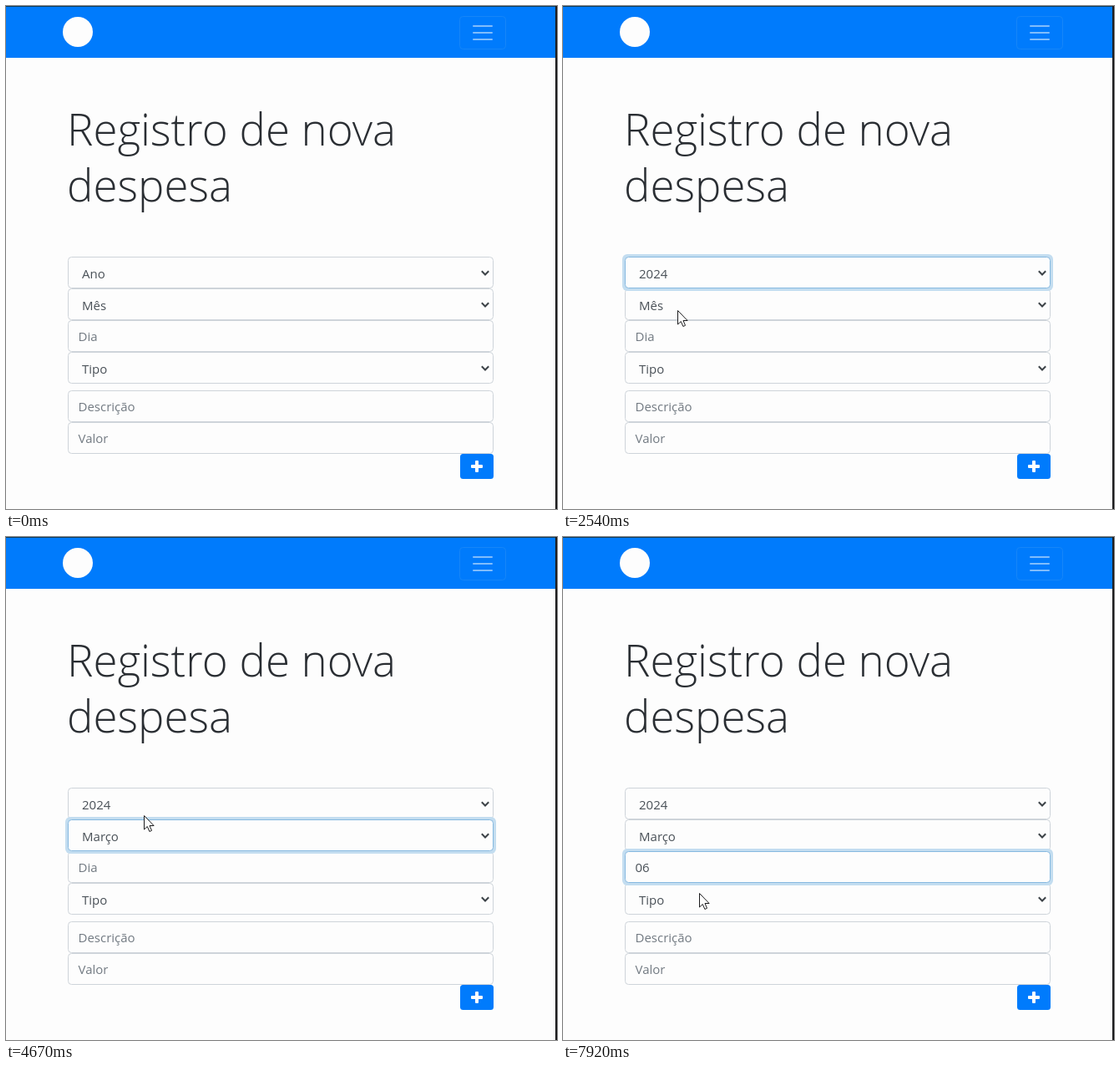
Recreate the animation shown at these times as an HTML page with a canvas. Size 660 px wide and 602 px high, loop 8000 ms.

```html
<!DOCTYPE html>
<html lang="pt-BR">
<head>
<meta charset="utf-8">
<title>Registro de nova despesa</title>
<style>
  html, body { margin: 0; width: 100%; height: 100%; overflow: hidden; background: #fdfdfd; }
  canvas { display: block; width: 660px; height: 602px; }
</style>
</head>
<body>
<canvas id="stage" width="660" height="602"></canvas>
<script>
const ctx = document.getElementById('stage').getContext('2d');
const LOOP = 8000;
const FONT = '"Open Sans", "Noto Sans", sans-serif';
const PAPER = '#fdfdfd', BLUE = '#007bfc', INK = '#495057', FAINT = '#727a82', TITLE = '#2a2e33';
const DARK = '#1c1c1e';
const LEFT = 74, WIDTH = 510, ROW = 22;
const MONTHS = ['Mês', 'Janeiro', 'Fevereiro', 'Março', 'Abril', 'Maio', 'Junho', 'Julho',
  'Agosto', 'Setembro', 'Outubro', 'Novembro', 'Dezembro'];

// Moments of the story, in ms
const T = {
  yearOpen: 290, yearHover: 750, yearPick: 1000, pointerIn: 1880,
  monthOpen: 3500, monthHover: 4040, monthPick: 4500,
  dayFocus: 5250, typeFirst: 6790, typeSecond: 7500, leaveDay: 7750
};

// Pointer stops: time, x, y
const PATH = [
  [1880, 162, 346], [2250, 140, 360], [2500, 137, 364], [2700, 137, 364], [3090, 140, 359],
  [3750, 140, 359], [3960, 153, 136], [4110, 156, 127], [4500, 157, 128],
  [4670, 165, 333], [5090, 167, 396], [7750, 167, 396], [7920, 163, 426]
];

const clamp = v => Math.max(0, Math.min(1, v));
const ease = v => v * v * (3 - 2 * v);
const within = (t, from, to) => t >= from && t < to;

function pointerAt(t) {
  const next = PATH.findIndex(p => p[0] > t);
  if (next < 0) return PATH[PATH.length - 1].slice(1);
  const a = PATH[Math.max(0, next - 1)], b = PATH[next];
  const k = ease(clamp((t - a[0]) / (b[0] - a[0] || 1)));
  return [a[1] + (b[1] - a[1]) * k, a[2] + (b[2] - a[2]) * k];
}

function text(str, x, y, color, size = 15, weight = 400) {
  ctx.font = `${weight} ${size}px ${FONT}`;
  ctx.fillStyle = color;
  ctx.fillText(str, x, y);
}

function rect(x, y, w, h, color) {
  ctx.fillStyle = color;
  ctx.fillRect(x, y, w, h);
}

function roundBox(x, y, w, h, r, fill, stroke) {
  ctx.beginPath();
  ctx.roundRect(x, y, w, h, r);
  if (fill) { ctx.fillStyle = fill; ctx.fill(); }
  if (stroke) { ctx.strokeStyle = stroke; ctx.lineWidth = 1; ctx.stroke(); }
}

function line(points, color, width) {
  ctx.beginPath();
  points.forEach(([x, y]) => ctx.lineTo(x, y));
  ctx.strokeStyle = color;
  ctx.lineWidth = width;
  ctx.stroke();
}

function shadow(color, blur, dy) {
  ctx.shadowColor = color;
  ctx.shadowBlur = blur;
  ctx.shadowOffsetY = dy;
}

function header() {
  rect(0, 0, 660, 62, BLUE);
  ctx.beginPath();
  ctx.arc(86, 31, 18, 0, Math.PI * 2);
  ctx.fillStyle = PAPER;
  ctx.fill();
  roundBox(543.5, 12.5, 55, 39, 4, null, '#1686f8');
  for (const y of [23, 31, 39]) roundBox(559, y, 24, 2, 1, '#80bdfc');
}

function heading() {
  ctx.font = `300 56px ${FONT}`;
  const size = 56 * 394 / ctx.measureText('Registro de nova').width;
  text('Registro de nova', 73, 167, TITLE, size, 300);
  text('despesa', 73, 234, TITLE, size, 300);
}

function field(y, label, { select = false, faint = false, focus = 0 } = {}) {
  if (focus > 0) {
    ctx.globalAlpha = focus;
    roundBox(LEFT - 3, y - 3, WIDTH + 6, 44, 6, '#c3ddf0');
    ctx.globalAlpha = 1;
  }
  roundBox(LEFT + .5, y + .5, WIDTH - 1, 37, 4, PAPER, focus > .5 ? '#86b9e0' : '#ced4da');
  text(label, select ? 91 : 86.5, y + (select ? 26 : 25), faint ? FAINT : INK);
  if (select) line([[569.8, y + 17.3], [574, y + 21.5], [578.2, y + 17.3]], '#3c4247', 2);
}

function button() {
  roundBox(544, 536, 40, 30, 3.5, BLUE);
  roundBox(557, 549, 14, 4, 1, PAPER);
  roundBox(562, 544, 4, 14, 1, PAPER);
}

function dropdown(y, items, active) {
  const h = items.length * ROW + 2;
  ctx.save();
  shadow('rgba(0, 0, 0, .36)', 14, 3);
  rect(LEFT, y, WIDTH, h, PAPER);
  ctx.restore();
  ctx.strokeStyle = '#6a6c70';
  ctx.lineWidth = 1;
  ctx.strokeRect(LEFT + .5, y + .5, WIDTH - 1, h - 1);
  items.forEach((item, i) => {
    const top = y + 1 + i * ROW;
    if (i === active) rect(LEFT + 1, top, WIDTH - 2, ROW, '#1d66b0');
    text(item, 91, top + 17, i === active ? PAPER : INK);
  });
}

function suggestions(items) {
  ctx.save();
  shadow('rgba(0, 0, 0, .35)', 5, 1);
  roundBox(172, 424, 156, 8 + items.length * 36, 7, DARK);
  ctx.restore();
  ctx.beginPath();
  ctx.moveTo(183, 425);
  ctx.lineTo(192.5, 416);
  ctx.lineTo(202, 425);
  ctx.fillStyle = DARK;
  ctx.fill();
  items.forEach((item, i) => text(item, 184, 451 + i * 36, '#e8e8ea', 13, 700));
}

function arrow(x, y) {
  const shape = [[0, 0], [0, 16.5], [3.8, 13], [6.4, 19], [9, 17.8], [6.5, 12], [11.6, 12]];
  ctx.beginPath();
  shape.forEach(([dx, dy]) => ctx.lineTo(x + .5 + dx, y + .5 + dy));
  ctx.closePath();
  ctx.fillStyle = PAPER;
  ctx.fill();
  ctx.strokeStyle = DARK;
  ctx.lineWidth = 1;
  ctx.stroke();
}

function beam(x, y) {
  x = Math.round(x);
  y = Math.round(y);
  rect(x, y - 7, 1, 15, DARK);
  for (const end of [y - 8, y + 8]) {
    rect(x - 3, end, 3, 1, DARK);
    rect(x + 1, end, 3, 1, DARK);
  }
}

function caret(t, typed) {
  if (t < T.dayFocus || t >= T.leaveDay) return;
  const since = t >= T.typeSecond ? T.typeSecond : t >= T.typeFirst ? T.typeFirst : T.dayFocus;
  if (Math.floor((t - since) / 540) % 2) return;
  ctx.font = `400 15px ${FONT}`;
  rect(Math.round(86.5 + ctx.measureText(typed).width), 387, 1, 18, DARK);
}

function draw(t) {
  const year = t >= T.yearPick ? '2024' : 'Ano';
  const month = t >= T.monthPick ? 'Março' : 'Mês';
  const typed = t >= T.typeSecond ? '06' : t >= T.typeFirst ? '0' : '';
  const glow = (from, to) => ease(clamp((t - from) / 150)) * (1 - ease(clamp((t - to) / 150)));

  rect(0, 0, 660, 602, PAPER);
  header();
  heading();

  const rows = [
    [300, year, { select: true, focus: glow(T.yearOpen, T.monthOpen) }],
    [338, month, { select: true, focus: glow(T.monthOpen, T.dayFocus) }],
    [376, typed || 'Dia', { faint: !typed, focus: glow(T.dayFocus, LOOP) }],
    [414, 'Tipo', { select: true }],
    [460, 'Descrição', { faint: true }],
    [498, 'Valor', { faint: true }]
  ];
  // The focused field is painted last so its ring stays on top
  rows.sort((a, b) => (a[2].focus || 0) - (b[2].focus || 0));
  rows.forEach(row => field(...row));
  button();
  caret(t, typed);

  if (within(t, T.yearOpen, T.yearPick)) dropdown(338, ['Ano', '2024'], t >= T.yearHover ? 1 : 0);
  if (within(t, T.monthOpen, T.monthPick)) dropdown(50, MONTHS, t >= T.monthHover ? 3 : 0);
  if (within(t, T.dayFocus, T.typeSecond)) {
    suggestions(t < T.typeFirst ? ['04', '05', '10'] : ['04', '05']);
  }

  rect(0, 0, 660, 1, '#123c58');
  rect(658, 0, 2, 602, DARK);

  if (t >= T.pointerIn) {
    const [x, y] = pointerAt(t);
    const overDay = t > T.monthPick && y >= 376 && y < 414;
    (overDay ? beam : arrow)(x, y);
  }
}

function tick() {
  draw(performance.now() % LOOP);
  requestAnimationFrame(tick);
}
tick();
</script>
</body>
</html>
```
